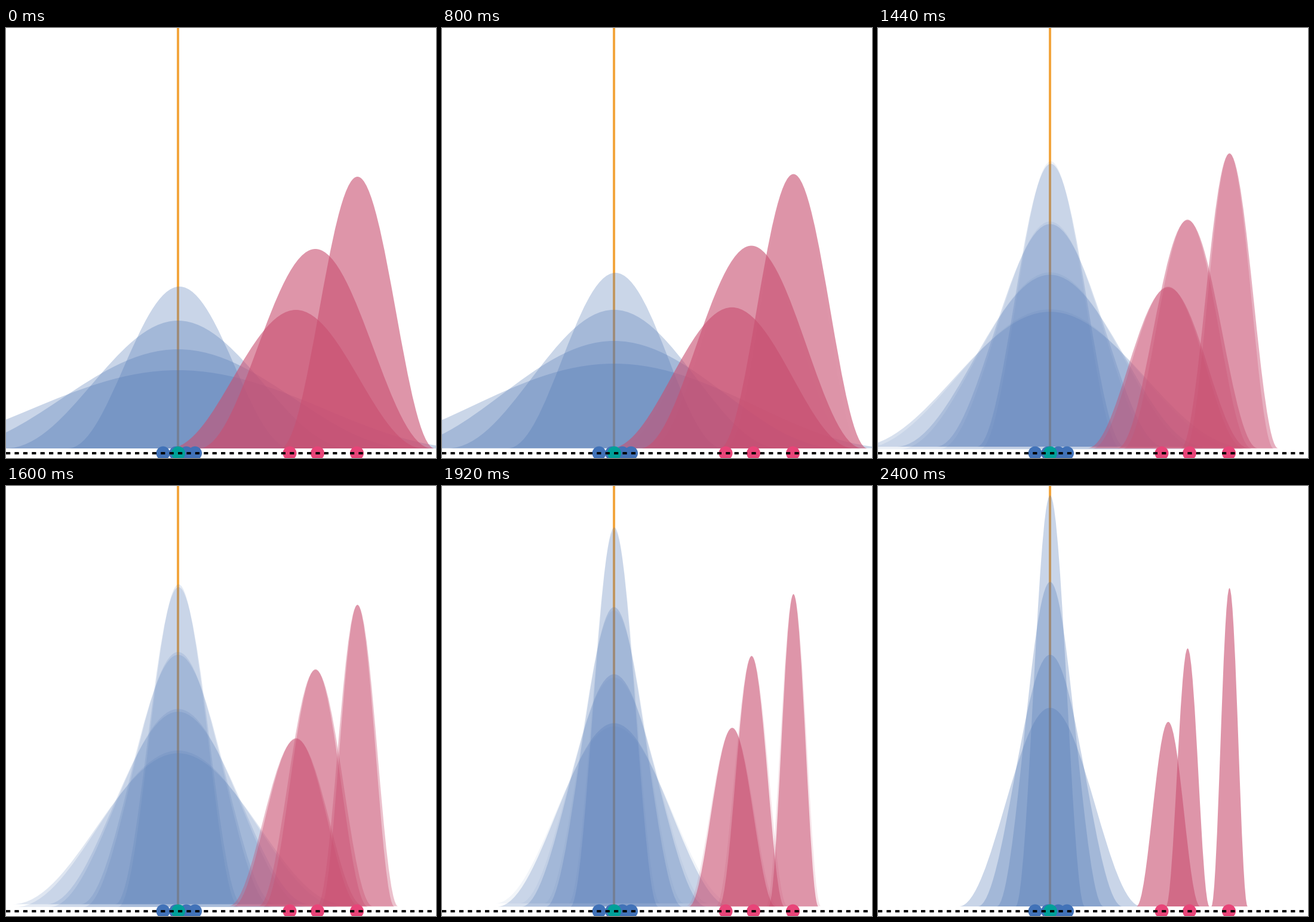
Recreate the animation shown at these times as a matplotlib script. Size 720 by 720 pixels, loop 2.92 s.

```python
import numpy as np
import matplotlib.pyplot as plt
from matplotlib.animation import FuncAnimation
from matplotlib.patches import Circle, PathPatch
from matplotlib.path import Path

SIZE = 720
STEP_MS = 40
LOOP_MS = 2920
START_MS, MOVE_MS = 480, 1920
BASE_Y, AXIS_Y = 704, 712
MEAN_X = 288
PAD = 4          # margin around each bell that stretches along with it
HANDLE = 0.3642  # handle length that makes each flank a cosine arc

BLUE, RED = "#4E76B5", "#C94F71"
BLUE_DOT, TEAL, PINK, ORANGE = "#4172B8", "#00A099", "#E84478", "#F2A53E"

# x in half widths, y in heights
BELL = np.array([
    (-1, 0), (HANDLE - 1, 0), (-HANDLE, 1), (0, 1),
    (HANDLE, 1), (1 - HANDLE, 0), (1, 0), (-1, 0),
])
CODES = [Path.MOVETO] + [Path.CURVE4] * 6 + [Path.CLOSEPOLY]


def lerp(a, b, p):
    return a + (b - a) * p


def stretched(shape, cx, box_half, box_height):
    """Path of a (center, height, half width) bell whose padded box fills the given box."""
    _, height, half = shape
    kx = box_half / (half + PAD)
    ky = box_height / (height + 2 * PAD)
    x = cx + BELL[:, 0] * half * kx
    y = BASE_Y + PAD - (PAD + BELL[:, 1] * height) * ky
    return Path(np.column_stack([x, y]), CODES)


class Bell:
    """Stretches from rest to narrow while the first shape dissolves into the second."""

    def __init__(self, ax, rest, narrow, color, alpha, z):
        self.rest, self.narrow, self.alpha = rest, narrow, alpha
        self.old, self.new = (
            ax.add_patch(PathPatch(Path(BELL, CODES), fc=color, ec="none", zorder=z))
            for _ in range(2))

    def set(self, p):
        cx, height, half = (lerp(a, b, p) for a, b in zip(self.rest, self.narrow))
        box = cx, half + PAD, height + 2 * PAD
        self.old.set_path(stretched(self.rest, *box))
        self.new.set_path(stretched(self.narrow, *box))
        # the two alphas together always cover as much as one full bell
        fading = self.alpha * (1 - p * p)
        self.old.set_alpha(fading)
        self.new.set_alpha(1 - (1 - self.alpha) / (1 - fading))


# ease-in-out curve with control points (0.42, 0) and (0.58, 1)
S = np.linspace(0, 1, 800)
EASE_X = 3 * S * (1 - S) ** 2 * 0.42 + 3 * S**2 * (1 - S) * 0.58 + S**3
EASE_Y = 3 * S**2 * (1 - S) + S**3


def progress(ms):
    return np.interp((ms - START_MS) / MOVE_MS, EASE_X, EASE_Y)


fig = plt.figure(figsize=(SIZE / 72, SIZE / 72), dpi=72, facecolor="white")
ax = fig.add_axes([0, 0, 1, 1])
ax.set_xlim(0, SIZE)
ax.set_ylim(SIZE, 0)
ax.axis("off")

ax.plot([MEAN_X] * 2, [-5, AXIS_Y], color=ORANGE, lw=4, snap=False, zorder=1)

bells = []
for i, (cx, height) in enumerate([(288, 131), (288, 166), (288, 214), (290.5, 271)]):
    half = 493 - 102 * i
    bells.append(Bell(ax, (cx, height, half), (MEAN_X + 0.2, height * 2.539, half * 0.31),
                      BLUE, 0.3, 2))

for rest, narrow in [((485.5, 232, 213), (486, 309, 53.5)),
                     ((518, 334, 195), (518.5, 432, 36.5)),
                     ((588.5, 455, 129.5), (588.5, 533, 30.5))]:
    bells.append(Bell(ax, rest, narrow, RED, 0.6, 3))

for xs, color in (((263, 284.5, 302, 316.5), BLUE_DOT),
                  ((288.5,), TEAL),
                  ((475, 521.5, 587.5), PINK)):
    for x in xs:
        ax.add_patch(Circle((x, AXIS_Y), 11.5, fc=color, ec="none", zorder=4))

ax.plot([0, SIZE], [AXIS_Y, AXIS_Y], color="black", lw=4, snap=False,
        ls=(0, (1.8, 1.8)), dash_capstyle="butt", zorder=5)


def update(frame):
    p = progress(frame * STEP_MS)
    for bell in bells:
        bell.set(p)
    return [part for bell in bells for part in (bell.old, bell.new)]


anim = FuncAnimation(fig, update, frames=LOOP_MS // STEP_MS, interval=STEP_MS,
                     init_func=lambda: update(0), repeat=True, repeat_delay=0)
plt.show()
```
